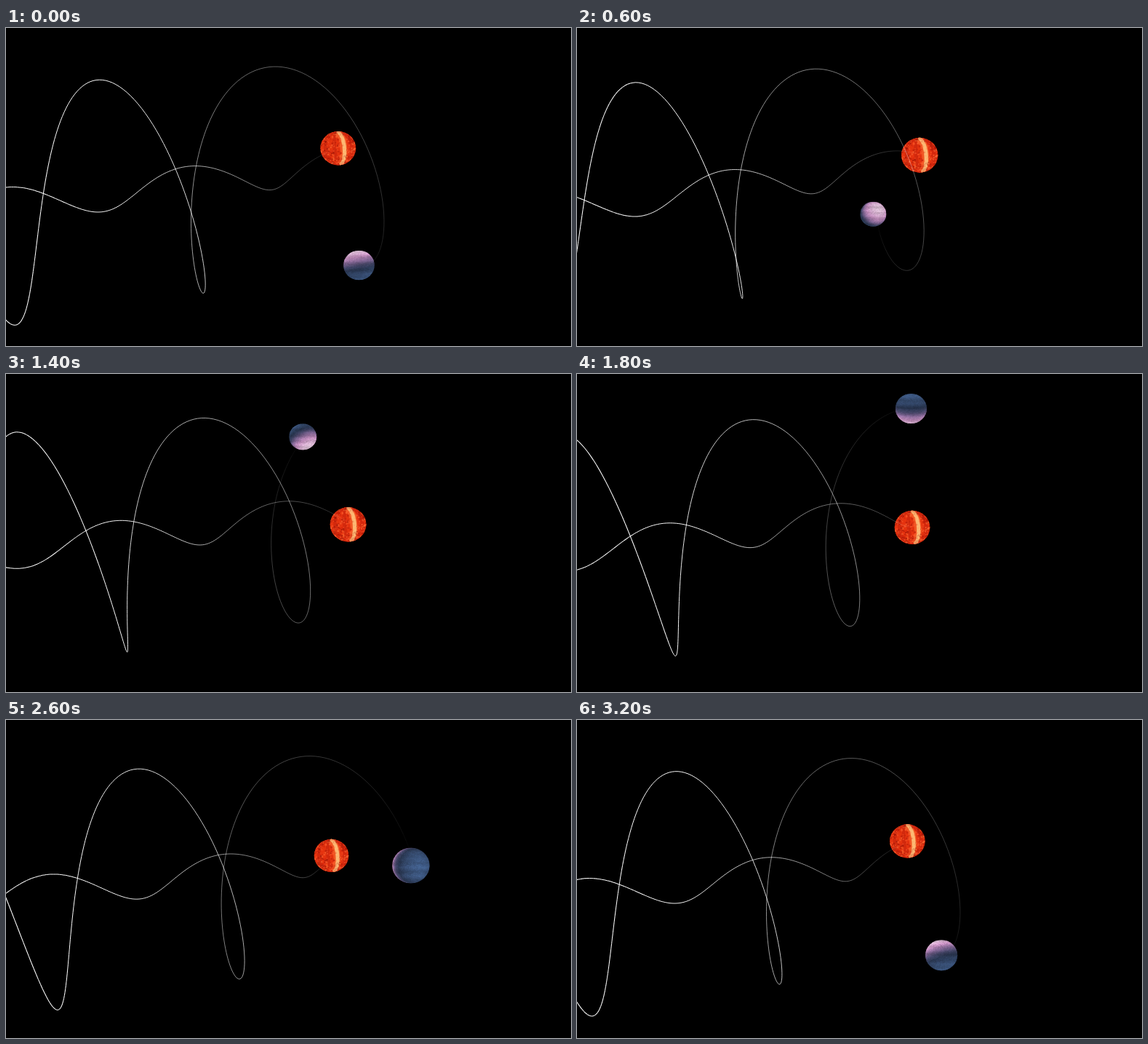
An HTML page with a canvas that plays this animation: 777 by 437 pixels, repeating every 3.3 s.

```html
<!DOCTYPE html>
<html lang="en">
<head>
<meta charset="utf-8">
<title>Binary orbit</title>
<style>
  html, body { margin: 0; width: 100%; height: 100%; overflow: hidden; background: #000; }
  canvas { display: block; }
</style>
</head>
<body>
<canvas id="stage" width="777" height="437"></canvas>
<script>
const ctx = document.getElementById('stage').getContext('2d');
const PERIOD = 3300, STEP = 100, TAU = Math.PI * 2;

// Circular orbit seen in perspective: screen = (centre + m * swing) / (1 + m * depth).
const STAR = { m: -0.168, size: 24.5 };
const PLANET = { m: 1, size: 20.9 };
const CENTRE = { x: 460.8, y: 187.95 };

// Trails recede from a vanishing point as they age, in a gently swaying frame.
const VANISH = { x: 3500, y: -184 }, DRIFT = -2.025e-5, LAG = 65, SWAY = 1.35;

function orbit(body, time) {
  const a = time / PERIOD * TAU, c = Math.cos(a), s = Math.sin(a);
  const depth = body.m * (-0.017 * c + 0.155 * s);
  return {
    x: CENTRE.x + body.m * (16.36 * c - 6.26 * s),
    y: CENTRE.y + body.m * (132.6 * c + 51.66 * s),
    w: 1 + depth,
    r: body.size / (1 + 1.2 * depth),
    sway: SWAY * c
  };
}

function trailPoint(body, time, age) {
  const p = orbit(body, time - age), k = DRIFT * (age - LAG);
  return {
    x: (p.x + k * VANISH.x) / (p.w + k),
    y: (p.y + p.sway + k * VANISH.y) / (p.w + k)
  };
}

function drawTrail(body, time) {
  let a = trailPoint(body, time, 80);
  for (let age = 110; age < 8600; age += 30) {
    const b = trailPoint(body, time, age);
    const glow = Math.min(1, Math.pow((age - 80) / 4500, 0.65));
    ctx.strokeStyle = `rgba(255,255,255,${glow})`;
    ctx.lineWidth = 0.7 + age / 18000;
    ctx.beginPath();
    ctx.moveTo(a.x, a.y);
    ctx.lineTo(b.x, b.y);
    ctx.stroke();
    a = b;
  }
}

function seeded(seed) {
  return () => (seed = (seed * 16807) % 2147483647) / 2147483647;
}

// Surface specks on the visible half of a unit sphere.
function makeSpecks(count, seed, colours) {
  const rnd = seeded(seed);
  return Array.from({ length: count }, () => {
    const lat = Math.asin(rnd() * 2 - 1), lon = (rnd() - 0.5) * Math.PI;
    return {
      x: Math.sin(lon) * Math.cos(lat), y: Math.sin(lat),
      size: 0.02 + rnd() * 0.035, colour: colours[Math.floor(rnd() * colours.length)]
    };
  });
}

const starSpecks = makeSpecks(380, 71, ['#ff5a2c', '#b01a08', '#ff7038', '#8f1206', '#d8260c']);

function drawSpecks(specks, alpha) {
  ctx.globalAlpha = alpha;
  for (const d of specks) {
    ctx.fillStyle = d.colour;
    ctx.fillRect(d.x - d.size, d.y - d.size, d.size * 2, d.size * 2);
  }
  ctx.globalAlpha = 1;
}

function meridian(lon, width, colour) {
  ctx.strokeStyle = colour;
  ctx.lineWidth = width;
  ctx.beginPath();
  for (let i = 0; i <= 24; i++) {
    const lat = (i / 24 - 0.5) * Math.PI;
    ctx.lineTo(Math.sin(lon) * Math.cos(lat), Math.sin(lat));
  }
  ctx.stroke();
}

// Clips to a slightly flattened disc and paints in unit coordinates.
function sphere(x, y, r, paint) {
  ctx.save();
  ctx.translate(x, y);
  ctx.scale(r, r * 0.95);
  ctx.beginPath();
  ctx.arc(0, 0, 1, 0, TAU);
  ctx.clip();
  paint();
  ctx.restore();
}

function drawStar(x, y, r) {
  sphere(x, y, r, () => {
    ctx.rotate(-0.09);
    ctx.fillStyle = '#e5330f';
    ctx.fillRect(-1.1, -1.1, 2.2, 2.2);
    meridian(-0.8, 0.2, '#c4200c88');
    meridian(-0.2, 0.2, '#c4200c88');
    meridian(0.32, 0.4, '#f4602acc');
    meridian(0.36, 0.22, '#f9a560');
    meridian(0.9, 0.2, '#c9220caa');
    drawSpecks(starSpecks, 0.55);
    meridian(0.36, 0.18, '#ffc88299');
  });
}

// Surface colour by light level, from the far side to full light.
const RAMP = [
  [-1, 70, 100, 146], [-0.25, 46, 60, 88], [0, 74, 76, 112],
  [0.3, 146, 114, 164], [0.6, 214, 156, 208], [1, 243, 212, 236]
];

function shade(level, gain) {
  const i = Math.max(1, RAMP.findIndex(stop => stop[0] >= level));
  const a = RAMP[i - 1], b = RAMP[i], f = (level - a[0]) / (b[0] - a[0]);
  const [red, green, blue] = [1, 2, 3].map(j => Math.round((a[j] + (b[j] - a[j]) * f) * gain));
  return `rgb(${red},${green},${blue})`;
}

function drawPlanet(x, y, r, angle, facing) {
  const lz = 0.85 * facing, flat = Math.sqrt(1 - lz * lz);
  const lx = Math.cos(angle) * flat, ly = Math.sin(angle) * flat;
  const cell = 1 / Math.round(r), rnd = seeded(29);
  sphere(x, y, r, () => {
    for (let v = -1; v < 1; v += cell) {
      for (let u = -1; u < 1; u += cell) {
        const z = Math.sqrt(Math.max(0, 1 - u * u - v * v));
        const level = Math.max(-1, Math.min(1, u * lx + v * ly + z * lz));
        ctx.fillStyle = shade(level, 0.88 + 0.2 * rnd() + 0.05 * Math.sin(v * 14));
        ctx.fillRect(u, v, cell * 1.3, cell * 1.3);
      }
    }
  });
}

function draw(time) {
  ctx.fillStyle = '#000';
  ctx.fillRect(0, 0, 777, 437);
  const s = orbit(STAR, time), p = orbit(PLANET, time);
  const sx = s.x / s.w, sy = s.y / s.w, px = p.x / p.w, py = p.y / p.w;
  drawStar(sx, sy, s.r);
  drawPlanet(px, py, p.r, Math.atan2(sy - py, sx - px), Math.sin(time / PERIOD * TAU));
  drawTrail(STAR, time);
  drawTrail(PLANET, time);
}

const start = performance.now();
function tick() {
  const t = Math.max(0, performance.now() - start) % PERIOD;
  draw(Math.floor(t / STEP) * STEP);
  requestAnimationFrame(tick);
}
tick();
</script>
</body>
</html>
```
